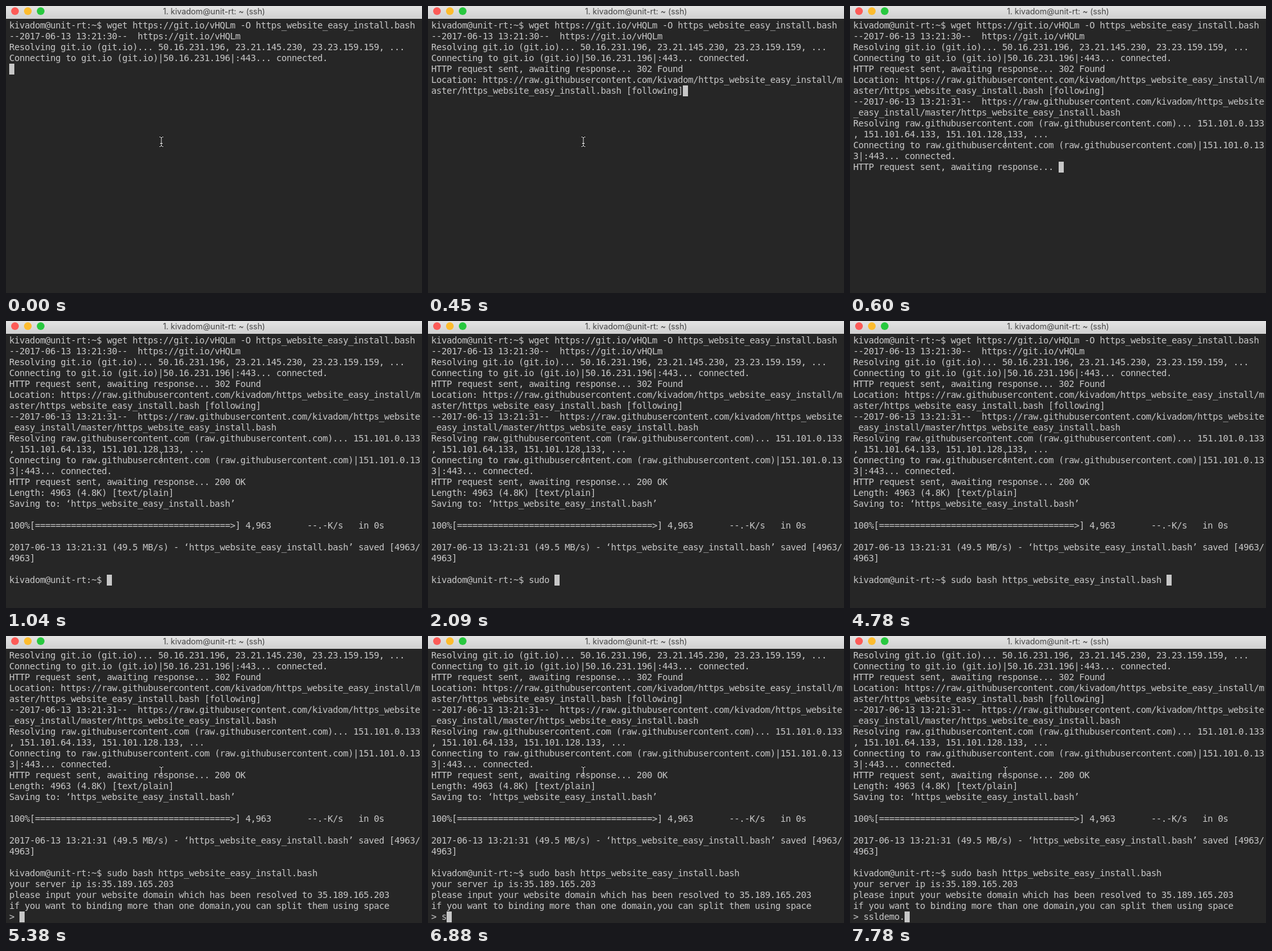
An HTML page with a canvas that plays this animation: 648 px wide and 448 px high, repeating every 8 s.

```html
<!DOCTYPE html>
<html lang="en">
<head>
<meta charset="utf-8">
<title>Terminal</title>
<style>
  html, body { margin: 0; width: 100%; height: 100%; overflow: hidden; background: #262626; }
  canvas { display: block; }
</style>
</head>
<body>
<canvas id="stage" width="648" height="448"></canvas>
<script>
const ctx = document.getElementById('stage').getContext('2d');

const W = 648, H = 448, LOOP = 8000;
const COLS = 80, ROWS = 25;
const CELL_W = 8, CELL_H = 17, LEFT = 5, TOP = 22, ASCENT = 13;
const BG = '#262626', FG = '#c7c7c7';

const USER = 'kivadom', HOST = 'unit-rt';
const PROMPT = `${USER}@${HOST}:~$ `;
const NAME = 'https_website_easy_install';
const FILE = NAME + '.bash';
const SHORT = 'https://git.io/vHQLm';
const RAW = 'raw.githubusercontent.com';
const URL_RAW = `https://${RAW}/${USER}/${NAME}/master/${FILE}`;
const WAITING = 'HTTP request sent, awaiting response... ';
const SERVER_IP = '35.189.165.203';

// [time in ms, output added]; \b removes the last character
const events = [
  [0, `${PROMPT}wget ${SHORT} -O ${FILE}\n` +
      `--2017-06-13 13:21:30--  ${SHORT}\n` +
      'Resolving git.io (git.io)... 50.16.231.196, 23.21.145.230, 23.23.159.159, ...\n' +
      'Connecting to git.io (git.io)|50.16.231.196|:443... connected.\n'],
  [300, WAITING],
  [450, `302 Found\nLocation: ${URL_RAW} [following]`],
  [600, `\n--2017-06-13 13:21:31--  ${URL_RAW}\n` +
        `Resolving ${RAW} (${RAW})... 151.101.0.133, 151.101.64.133, 151.101.128.133, ...\n` +
        `Connecting to ${RAW} (${RAW})|151.101.0.133|:443... connected.\n` + WAITING],
  [890, '200 OK\nLength: 4963 (4.8K) [text/plain]'],
  [1040, `\nSaving to: ‘${FILE}’\n\n` +
         `100%[${'='.repeat(38)}>] 4,963       --.-K/s   in 0s\n\n` +
         `2017-06-13 13:21:31 (49.5 MB/s) - ‘${FILE}’ saved [4963/4963]\n\n` + PROMPT],
  [1640, 's'], [1790, 'ud'], [1940, 'o'], [2090, ' '], [2240, 'ba'], [2540, 'sh '],
  [3740, 'h'], [4040, '\b'], [4480, 'h'], [4780, FILE.slice(1) + ' '],
  [5380, `\nyour server ip is:${SERVER_IP}\n` +
         `please input your website domain which has been resolved to ${SERVER_IP}\n` +
         'if you want to binding more than one domain,you can split them using space\n> '],
  [6880, 's'], [7030, 'sl'], [7180, 'd'], [7330, 'e'], [7480, 'm'], [7780, 'o.']
];

function screenRows(time) {
  const rows = [''];
  for (const [start, text] of events) {
    if (start > time) break;
    for (const ch of text) {
      const last = rows.length - 1;
      if (ch === '\n') rows.push('');
      else if (ch === '\b') rows[last] = rows[last].slice(0, -1);
      else if (rows[last].length === COLS) rows.push(ch);
      else rows[last] += ch;
    }
  }
  return rows.slice(-ROWS);
}

function drawTitleBar() {
  const shade = ctx.createLinearGradient(0, 0, 0, 20);
  shade.addColorStop(0, '#e4e4e4');
  shade.addColorStop(1, '#d0d0d0');
  ctx.fillStyle = shade;
  ctx.fillRect(0, 0, W, 20);

  ['#fc5b57', '#fdbc2e', '#28c83f'].forEach((color, i) => {
    ctx.fillStyle = color;
    ctx.beginPath();
    ctx.arc(14 + 20 * i, 8, 6, 0, Math.PI * 2);
    ctx.fill();
  });

  ctx.font = '12.5px Inter, Roboto, sans-serif';
  ctx.textAlign = 'center';
  ctx.fillStyle = '#444';
  ctx.fillText(`1. ${USER}@${HOST}: ~ (ssh)`, 324, 13);
}

function drawText(rows) {
  ctx.font = '14px "DejaVu Sans Mono", monospace';
  ctx.textAlign = 'left';
  ctx.fillStyle = FG;
  rows.forEach((row, r) => {
    const y = TOP + r * CELL_H + ASCENT;
    [...row].forEach((ch, c) => {
      if (ch !== ' ') ctx.fillText(ch, LEFT + c * CELL_W, y);
    });
  });
  const r = rows.length - 1;
  ctx.fillRect(LEFT + rows[r].length * CELL_W, TOP + r * CELL_H, CELL_W, CELL_H);
}

function drawPointer() {
  const beam = new Path2D(
    'M239 204.5h1.5l1.5 1.5 1.5-1.5h1.5M242 206v12M239 219.5h1.5l1.5-1.5 1.5 1.5h1.5M240 214.5h4');
  ctx.strokeStyle = '#111';
  ctx.lineWidth = 2.4;
  ctx.stroke(beam);
  ctx.strokeStyle = '#f0f0f0';
  ctx.lineWidth = 1;
  ctx.stroke(beam);
}

function draw(time) {
  ctx.fillStyle = BG;
  ctx.fillRect(0, 0, W, H);
  drawTitleBar();
  drawText(screenRows(time));
  drawPointer();
}

const begin = performance.now();
function tick() {
  draw((performance.now() - begin) % LOOP);
  requestAnimationFrame(tick);
}
tick();
</script>
</body>
</html>
```
